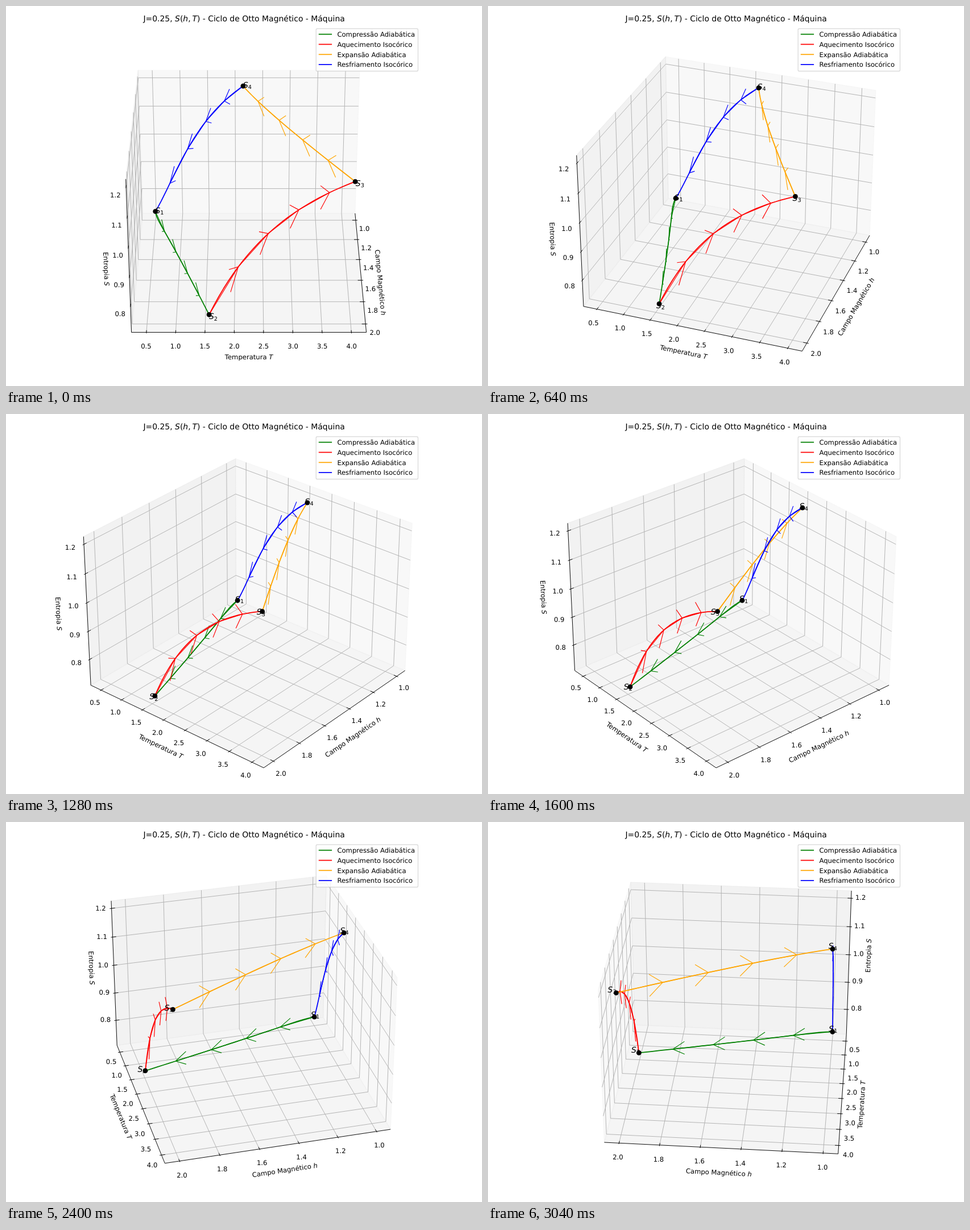
Animation of 837x669 px, one loop 3.2 s. Source, as an HTML page with a canvas:

```html
<!DOCTYPE html>
<html lang="pt">
<head>
<meta charset="utf-8">
<title>Ciclo de Otto Magnético</title>
<style>
html, body { margin: 0; width: 100%; height: 100%; overflow: hidden; background: #fff; }
canvas { display: block; }
</style>
</head>
<body>
<canvas id="stage" width="837" height="669"></canvas>
<script>
const ctx = document.getElementById('stage').getContext('2d');
ctx.textRendering = 'geometricPrecision';

const PT = 1.1625;                        // pixels per point
const SCALE = 3368, CX = 427.1, CY = 337.1, DIST = 10, ELEV = Math.PI / 6;
const STEP_MS = 160, STEPS = 20, STEP_DEG = 5;
const SIZE = [8 / 7, 8 / 7, 6 / 7];       // box size spanned by the axis limits
const HALF = SIZE.map(s => s * 25 / 48);  // half size of the drawn box

// Thermodynamics: four levels of two coupled spins
function entropy(h, T) {
  const levels = [-2 * h, 0, 2 * h, -2];
  const weights = levels.map(e => Math.exp(-e / T));
  const Z = weights.reduce((a, b) => a + b);
  const E = levels.reduce((sum, e, i) => sum + e * weights[i], 0) / Z;
  return Math.log(Z) + E / T;
}
function solveT(h, S) {
  let lo = 0.1, hi = 10;
  for (let i = 0; i < 50; i++) {
    const mid = (lo + hi) / 2;
    if (entropy(h, mid) < S) lo = mid; else hi = mid;
  }
  return lo;
}

const LOW = entropy(1, 0.5), HIGH = entropy(2, 4);
const T2 = solveT(2, LOW), T4 = solveT(1, HIGH);
const path = (from, to, point) =>
  Array.from({ length: 30 }, (_, i) => point(from + (to - from) * i / 29));
const curves = [
  { name: 'Compressão Adiabática', color: 'green', pts: path(1, 2, h => [h, solveT(h, LOW), LOW]) },
  { name: 'Aquecimento Isocórico', color: 'red', pts: path(T2, 4, T => [2, T, entropy(2, T)]) },
  { name: 'Expansão Adiabática', color: 'orange', pts: path(2, 1, h => [h, solveT(h, HIGH), HIGH]) },
  { name: 'Resfriamento Isocórico', color: 'blue', pts: path(T4, 0.5, T => [1, T, entropy(1, T)]) }
];
const states = [[1, 0.5, LOW], [2, T2, LOW], [2, 4, HIGH], [1, T4, HIGH]];

const ticks = (from, step, n) => Array.from({ length: n }, (_, i) => from + step * i);
const axes = [
  { label: 'Campo Magnético $h$', ticks: ticks(1, 0.2, 6), mid: 1.5, span: 1, tickDir: 1, pane: 242.25 },
  { label: 'Temperatura $T$', ticks: ticks(0.5, 0.5, 8), mid: 2.25, span: 3.5, tickDir: 0, pane: 229.5 },
  { label: 'Entropia $S$', ticks: ticks(0.8, 0.1, 5), mid: (LOW + HIGH) / 2, span: HIGH - LOW, tickDir: 0, pane: 235.9 }
];
const toBox = (v, i) => (v - axes[i].mid) / (1.1 * axes[i].span) * SIZE[i];

// Camera
let ca = 1, sa = 0;
const ce = Math.cos(ELEV), se = Math.sin(ELEV);
function project([x, y, z]) {
  const k = SCALE / (DIST - (ce * (ca * x + sa * y) + se * z));
  return [CX + k * (ca * y - sa * x), CY - k * (ce * z - se * (ca * x + sa * y))];
}
const projectData = p => project(p.map(toBox));

function trace(points) {
  ctx.beginPath();
  points.forEach(([x, y]) => ctx.lineTo(x, y));
}
function stroke(points, color, points_wide) {
  trace(points);
  ctx.strokeStyle = color;
  ctx.lineWidth = points_wide * PT;
  ctx.stroke();
}

// Text; parts between $ signs are italic
function setFont(size, italic) {
  ctx.font = `${italic ? 'italic ' : ''}${size * PT * 100 / 100}px "DejaVu Sans", sans-serif`;
}
function write(text, x, y, size = 10, align = 0.5) {
  const runs = text.split('$').map((s, i) => {
    setFont(size, i % 2);
    return { s, italic: i % 2, width: ctx.measureText(s).width };
  });
  x -= align * runs.reduce((sum, r) => sum + r.width, 0);
  ctx.fillStyle = '#000';
  for (const r of runs) {
    setFont(size, r.italic);
    ctx.fillText(r.s, x, y);
    x += r.width;
  }
}

function drawPane(i, far) {
  const [j, k] = [0, 1, 2].filter(n => n !== i);
  trace([[-1, -1], [1, -1], [1, 1], [-1, 1]].map(([a, b]) => {
    const p = [];
    p[i] = far[i] * HALF[i];
    p[j] = a * HALF[j];
    p[k] = b * HALF[k];
    return project(p);
  }));
  ctx.closePath();
  ctx.fillStyle = ctx.strokeStyle = `rgba(${axes[i].pane},${axes[i].pane},${axes[i].pane},0.5)`;
  ctx.lineWidth = PT;
  ctx.fill();
  ctx.stroke();
}

function drawAxis(i, far, side) {
  const axis = axes[i], d = axis.tickDir;
  const [j, k] = [0, 1, 2].filter(n => n !== i);
  // Point on the axis edge, pushed outwards by a share of the box
  const edge = (at, push = 0, only = -1) => side.map((s, n) => n === i ? at :
    s * (HALF[n] + (only < 0 || only === n ? push * SIZE[n] / 12 : 0)));

  for (const value of axis.ticks) {
    const at = toBox(value, i);
    const wall = (a, b) => {
      const p = [];
      p[i] = at;
      p[j] = a * HALF[j];
      p[k] = b * HALF[k];
      return project(p);
    };
    stroke([wall(-far[j], far[k]), wall(far[j], far[k]), wall(far[j], -far[k])], '#b0b0b0', 0.8);
  }

  const ends = [project(edge(-HALF[i])), project(edge(HALF[i]))];
  stroke(ends, '#000', 0.8);
  for (const value of axis.ticks) {
    const at = toBox(value, i);
    stroke([project(edge(at, 0.1, d)), project(edge(at, -0.2, d))], '#000', 0.8);
    const [x, y] = project(edge(at, 0.515));
    write(value.toFixed(1), x, y + 8.8);
  }

  const [x, y] = project(edge(0, 1.1194));
  ctx.save();
  ctx.translate(x, y);
  ctx.rotate(Math.atan((ends[1][1] - ends[0][1]) / (ends[1][0] - ends[0][0])));
  write(axis.label, 0, 3.2);
  ctx.restore();
}

function drawArrow(tail, tip, color) {
  const [x, y, z] = tip.map((v, i) => v - tail[i]);
  const n = Math.hypot(x, y), c = Math.cos(Math.PI / 12), s = Math.sin(Math.PI / 12);
  const barb = sign => {
    const turn = [-x * z / n, -y * z / n, n];
    return projectData([x, y, z].map((v, i) => tip[i] - 0.3 * (c * v + sign * s * turn[i])));
  };
  const end = projectData(tip);
  stroke([projectData(tail), end], color, 1);
  stroke([barb(1), end], color, 1);
  stroke([barb(-1), end], color, 1);
}

function drawLegend() {
  ctx.beginPath();
  ctx.roundRect(545.2, 39.9, 179.3, 74.8, 2.3);
  ctx.fillStyle = 'rgba(255,255,255,0.8)';
  ctx.strokeStyle = 'rgba(204,204,204,0.8)';
  ctx.lineWidth = PT;
  ctx.fill();
  ctx.stroke();
  curves.forEach(({ name, color }, i) => {
    const y = 49.7 + 17.8 * i;
    stroke([[549.8, y], [573.1, y]], color, 1.5);
    write(name, 582.4, y + 4.2, 10, 0);
  });
}

function draw(azimuth) {
  const a = azimuth * Math.PI / 180;
  ca = Math.cos(a);
  sa = Math.sin(a);
  ctx.fillStyle = '#fff';
  ctx.fillRect(0, 0, 837, 669);
  ctx.lineJoin = 'round';

  const near = azimuth <= 90 ? 1 : -1;
  const far = [-near, -1, -1];
  const sides = [[0, 1, -1], [near, 0, -1], [near, -1, 0]];
  axes.forEach((_, i) => drawPane(i, far));
  axes.forEach((_, i) => drawAxis(i, far, sides[i]));

  for (const { pts, color } of curves) {
    stroke(pts.map(projectData), color, 1.5);
    for (let i = 0; i < 24; i += 6) drawArrow(pts[i], pts[i + 6], color);
  }
  states.forEach(([h, T, S], i) => {
    const [x, y] = projectData([h, T, S]);
    ctx.fillStyle = '#000';
    ctx.beginPath();
    ctx.arc(x, y, 4.4, 0, 2 * Math.PI);
    ctx.fill();
    const [tx, ty] = projectData([h * 1.02, T, S]);
    write('$S$', tx, ty, 12, 0);
    write(String(i + 1), tx + 8.9, ty + 2.3, 8.4, 0);
  });

  write('J=0.25, $S$($h$,\u2009$T$) - Ciclo de Otto Magnético - Máquina', 418.6, 27, 12);
  drawLegend();
}

function tick() {
  draw(Math.floor(performance.now() / STEP_MS) % STEPS * STEP_DEG);
  requestAnimationFrame(tick);
}
tick();
</script>
</body>
</html>
```
